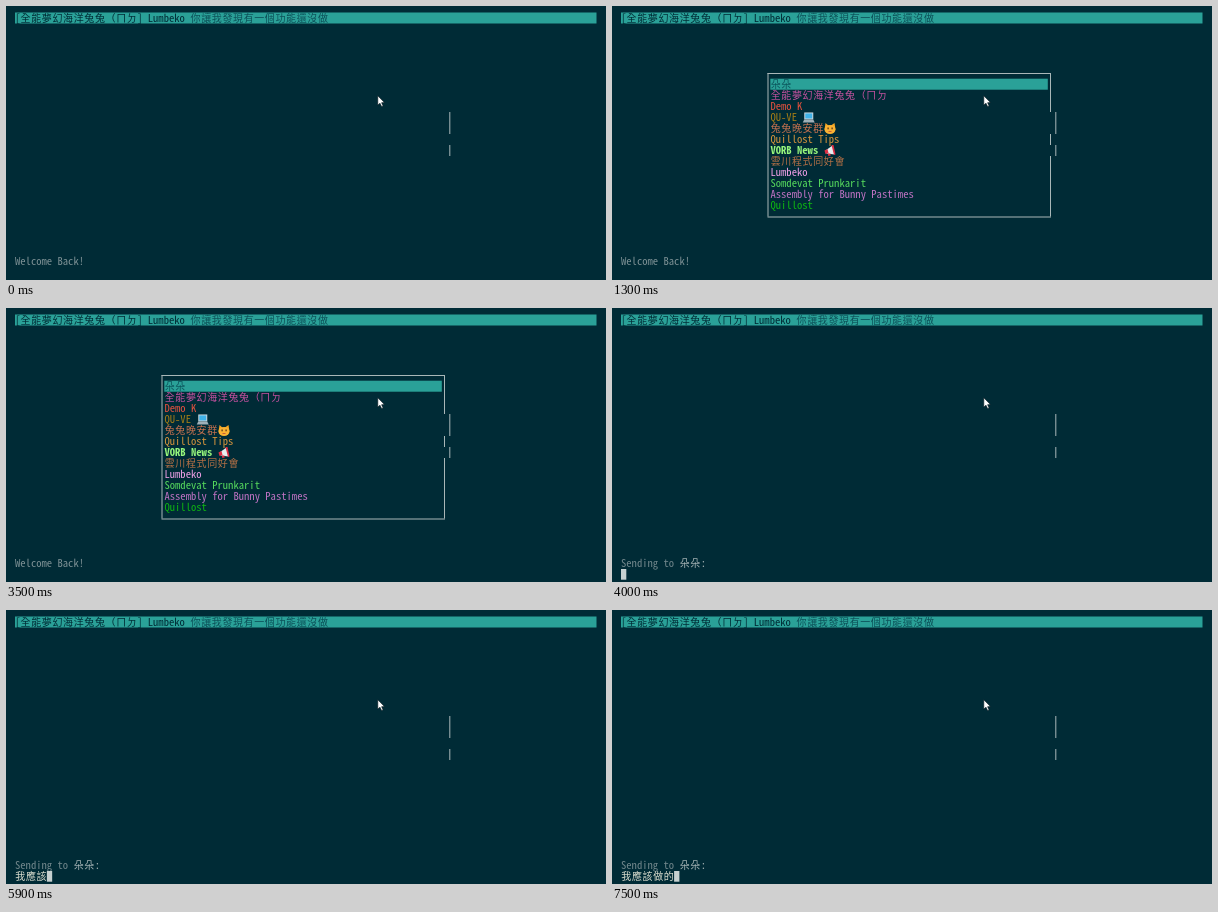
Recreate the animation shown at these times as an HTML page with a canvas. Size 600 by 274 pixels, loop 8000 ms.

```html
<!DOCTYPE html>
<html lang="zh-Hant">
<head>
<meta charset="utf-8">
<title>Terminal chat</title>
<style>
  html, body { margin: 0; width: 100%; height: 100%; overflow: hidden; background: #002b36; }
  canvas { display: block; width: 600px; height: 274px; }
</style>
</head>
<body>
<canvas id="stage"></canvas>
<script>
const LOOP = 8000;
const LEFT = 9, CELL = 5.31, TOP = 12.1, ROW = 11.04;
const FAMILY = '"Noto Sans Mono CJK TC", "Noto Sans CJK TC", "Noto Sans CJK", "Liberation Mono", monospace';
const TEAL = '#2aa198', LINE = '#a9b7b8';

const GROUP = '全能夢幻海洋兔兔（ㄇㄉ';
const FRIEND = 'Lumbeko';
const RECIPIENT = '朵朵';

// Label, colour, weight, icon
const CHATS = [
  [RECIPIENT, '#0b535a', 400],
  [GROUP, '#c452a0', 400],
  ['Demo K', '#e4523f', 500],
  ['QU-VE', '#a47d16', 500, laptop],
  ['兔兔晚安群', '#c4714f', 400, cat],
  ['Quillost Tips', '#d6953d', 500],
  ['VORB News', '#97f67c', 700, megaphone],
  ['雲川程式同好會', '#b57146', 400],
  [FRIEND, '#ee9fe6', 500],
  ['Somdevat Prunkarit', '#55d95d', 500],
  ['Assembly for Bunny Pastimes', '#bd72c2', 500],
  ['Quillost', '#0eb512', 500],
];

const canvas = document.getElementById('stage');
const scale = window.devicePixelRatio || 1;
canvas.width = 600 * scale;
canvas.height = 274 * scale;
const ctx = canvas.getContext('2d');
ctx.scale(scale, scale);

const rowY = row => TOP + row * ROW;
const isWide = ch => ch.codePointAt(0) > 0x2e80;

function rect(color, x, y, w, h) {
  ctx.fillStyle = color;
  ctx.fillRect(x, y, w, h);
}

function shape(color, points) {
  ctx.fillStyle = color;
  ctx.beginPath();
  points.forEach(([x, y]) => ctx.lineTo(x, y));
  ctx.closePath();
  ctx.fill();
}

// Places text on the terminal grid and returns the x after it.
function print(text, x, row, color, weight = 400) {
  ctx.fillStyle = color;
  for (const ch of text) {
    const wide = isWide(ch);
    ctx.font = `${weight} ${wide ? 10 : 10.62}px ${FAMILY}`;
    ctx.fillText(ch, x + (wide ? 0.3 : 0), rowY(row) + 3.7);
    x += CELL * (wide ? 2 : 1);
  }
  return x;
}

function laptop(x, y) {
  rect('#c9d6dc', x + 2, y - 5, 9, 7);
  rect('#3fb2e8', x + 3, y - 4, 7, 5);
  shape('#9fb0b8', [[x + 2, y + 2], [x + 11, y + 2], [x + 12.5, y + 5], [x + 0.5, y + 5]]);
}

function cat(x, y) {
  shape('#f5a623', [[x + 2, y - 5.5], [x + 6, y - 2], [x + 11, y - 5.5], [x + 12, y + 1], [x + 1, y + 1]]);
  ctx.fillStyle = '#f9b233';
  ctx.beginPath();
  ctx.ellipse(x + 6.5, y + 1, 5.5, 4.5, 0, 0, 7);
  ctx.fill();
  rect('#503018', x + 4, y - 1, 1.2, 1.8);
  rect('#503018', x + 8, y - 1, 1.2, 1.8);
  rect('#c75b39', x + 5, y + 2.5, 3, 1);
}

function megaphone(x, y) {
  shape('#e8eef0', [[x + 2, y], [x + 9, y - 5], [x + 11, y + 4], [x + 3, y + 3]]);
  shape('#dd2e44', [[x + 1, y], [x + 4, y - 1.5], [x + 5, y + 2.5], [x + 2, y + 3.5]]);
  shape('#dd2e44', [[x + 8, y - 5.5], [x + 10, y - 5.5], [x + 12, y + 4], [x + 10.5, y + 4.5]]);
  rect('#dd2e44', x + 4.5, y + 3, 2.5, 2.2);
}

function drawTitle() {
  rect(TEAL, LEFT, 6.5, 581.5, 11);
  let x = print(`[${GROUP}] `, LEFT, 0, '#012c36', 500);
  x = print(`${FRIEND} `, x, 0, '#012c36', 500);
  print('你讓我發現有一個功能還沒做', x, 0, '#0c5058');
}

function drawStrays() {
  rect(LINE, 443.3, 106, 1, 22);
  rect(LINE, 443.3, 139, 1, 11);
}

function drawMenu() {
  const left = 155.5, right = 438, top = 67, bottom = 210.5;
  rect(LINE, left, top, right - left + 1, 1);
  rect(LINE, left, bottom, right - left + 1, 1);
  rect(LINE, left, top, 1, bottom - top);
  for (const [from, to] of [[top, 106], [128, 139], [150, bottom]]) {
    rect(LINE, right, from, 1, to - from);
  }
  rect(TEAL, 158.3, 72.7, 277.5, 11);
  CHATS.forEach(([label, color, weight, icon], i) => {
    const x = print(label, 158.4, i + 6, color, weight);
    if (icon) icon(x + (isWide(label[0]) ? 0 : CELL), rowY(i + 6));
  });
}

function drawPrompt(typed) {
  let x = print('Sending to ', LEFT, 22, '#71878c');
  x = print(RECIPIENT, x, 22, '#a9b7b8');
  print(':', x, 22, '#a9b7b8');
  x = print(typed, LEFT, 23, '#dcdfd0');
  rect('#c6d0d0', x, 261, CELL, 10.7);
}

function drawPointer() {
  ctx.save();
  ctx.translate(371.8, 89.8);
  const arrow = [[0, 0], [0, 9.3], [2.2, 7.4], [3.8, 10.8], [5.3, 10.1], [3.8, 6.9], [6.6, 6.7]];
  shape('#ffffff', arrow);
  ctx.strokeStyle = '#0a1a20';
  ctx.lineWidth = 0.6;
  ctx.stroke();
  ctx.restore();
}

function draw(t) {
  const menuOpen = (t >= 600 && t < 3000) || (t >= 3500 && t < 3800);
  const typed = (t >= 5600 ? '我應該' : '') + (t >= 6700 ? '做的' : '');
  rect('#002b36', 0, 0, 600, 274);
  drawTitle();
  drawStrays();
  if (menuOpen) drawMenu();
  if (t >= 3800) drawPrompt(typed);
  else print('Welcome Back!', LEFT, 22, '#7d9195');
  drawPointer();
}

const start = performance.now();
function tick() {
  draw((performance.now() - start) % LOOP);
  requestAnimationFrame(tick);
}
tick();
</script>
</body>
</html>
```
